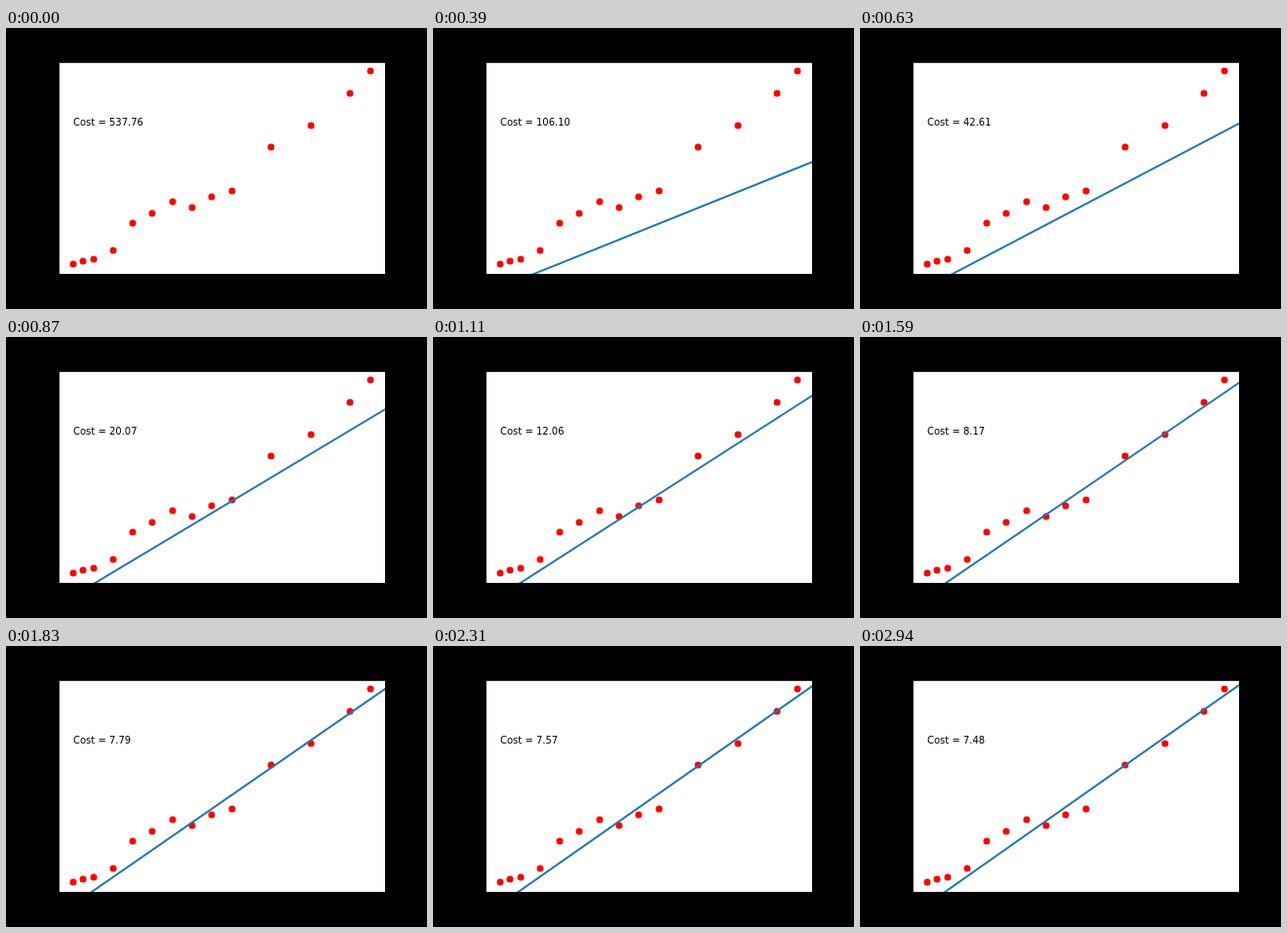
Write an HTML page that moves like this. It is 432x288 px and loops after 3000 ms.

```html
<!DOCTYPE html>
<html lang="en">
<head>
<meta charset="utf-8">
<title>Gradient descent fit</title>
<style>
  html, body { margin: 0; width: 100%; height: 100%; overflow: hidden; background: #000; }
  svg { display: block; }
  text { font: 10px "DejaVu Sans", sans-serif; white-space: pre; }
</style>
</head>
<body>
<svg width="432" height="288" viewBox="0 0 432 288">
  <clipPath id="plot"><rect x="55" y="36" width="334" height="216"/></clipPath>
  <rect width="432" height="288"/>
  <rect x="54" y="35" width="335" height="217" fill="#333"/>
  <rect x="55" y="36" width="334" height="216" fill="#fff"/>
  <g id="dots" fill="#f00"></g>
  <line id="fit" clip-path="url(#plot)" stroke="#1f77b4" stroke-width="2"/>
  <text id="cost" x="69" y="100"></text>
</svg>
<script>
const STEP_MS = 30, LOOP_MS = 3000, LAST_STEP = 98;
const RATE = 0.001, START_COST = 537.76;

// Axes: pixel position of the data origin and pixels per unit
const toX = x => 69.22 + 20.291 * x;
const toY = y => 266.75 - 4.958 * y;

const xs = [0, 0.5, 1, 2, 3, 4, 5, 6, 7, 8, 10, 12, 14, 15];
const dotYs = [242, 239, 237, 228, 200, 190, 178, 184, 173, 167, 122, 100, 67, 44];

// The descent splits into two independent eigenmodes of the squared-error surface:
// curvature, cost it can remove, and direction in (intercept, slope).
const modes = [
  { curvature: 62.72215, gain: 529.978, dir: [0.10075, 0.99491] },
  { curvature: 0.36715, gain: 4.36, dir: [0.99491, -0.10075] }
];

const byId = id => document.getElementById(id);
const fit = byId("fit"), cost = byId("cost");

xs.forEach((x, i) => {
  const dot = document.createElementNS("http://www.w3.org/2000/svg", "circle");
  dot.setAttribute("cx", Math.round(toX(x)));
  dot.setAttribute("cy", dotYs[i]);
  dot.setAttribute("r", 3.5);
  byId("dots").append(dot);
});

function modelAt(step) {
  const model = { intercept: 0, slope: 0, cost: START_COST };
  for (const { curvature, gain, dir } of modes) {
    const left = (1 - RATE * curvature) ** step;
    const travel = Math.sqrt(gain / curvature) * (1 - left);
    model.intercept += travel * dir[0];
    model.slope += travel * dir[1];
    model.cost -= gain * (1 - left * left);
  }
  return model;
}

function draw(time) {
  const step = Math.min(LAST_STEP, Math.floor((time % LOOP_MS) / STEP_MS));
  const model = modelAt(step);
  [-1, 17].forEach((x, i) => {
    fit.setAttribute("x" + (i + 1), toX(x));
    fit.setAttribute("y" + (i + 1), toY(model.intercept + model.slope * x));
  });
  cost.textContent = "Cost = " + model.cost.toFixed(2);
}

function tick() {
  draw(performance.now());
  requestAnimationFrame(tick);
}
tick();
</script>
</body>
</html>
```
